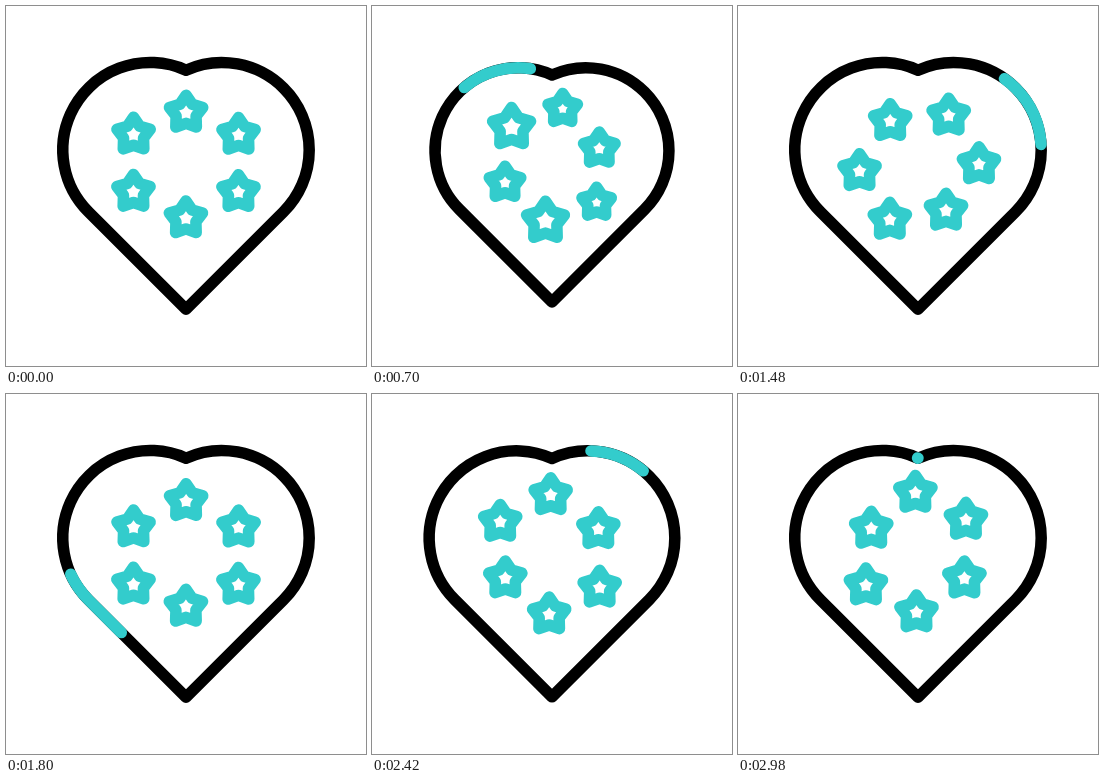
Animation, 360 px wide and 360 px high, one loop 3000 ms. Source, as an HTML page with a canvas:

```html
<!DOCTYPE html>
<html lang="en">
<head>
<meta charset="utf-8">
<title>Heart with circling stars</title>
<style>
  html, body { margin: 0; width: 100%; height: 100%; overflow: hidden; background: #fff; }
  canvas { display: block; }
</style>
</head>
<body>
<canvas id="stage" width="360" height="360"></canvas>
<script>
const ctx = document.getElementById('stage').getContext('2d');
const LOOP = 3000, BEAT = 1800, TURN = 3600;
const CX = 180, CY = 159.8, STROKE = 11.5, TEAL = '#33cccc';
const rad = deg => deg * Math.PI / 180;
const smooth = u => { u = Math.min(1, Math.max(0, u)); return u * u * (3 - 2 * u); };

// Eased values at evenly spaced times.
function keys(values, step, t) {
  const last = values.length - 1;
  if (t <= 0) return values[0];
  if (t >= last * step) return values[last];
  const i = Math.floor(t / step);
  return values[i] + (values[i + 1] - values[i]) * smooth(t / step - i);
}

// Heart: two arcs and a 45 degree point, starting at the notch, counter-clockwise.
const LOBE = 87.4, SIDE = 35.8, LOBE_Y = 143.9;
const notch = Math.asin(SIDE / LOBE);
const heart = new Path2D();
heart.arc(CX - SIDE, LOBE_Y, LOBE, rad(-90) + notch, rad(-225), true);
heart.lineTo(CX, LOBE_Y + LOBE * Math.SQRT2 + SIDE);
heart.arc(CX + SIDE, LOBE_Y, LOBE, rad(45), rad(-90) - notch, true);
heart.closePath();
const heartLength = 2 * (LOBE * (rad(135) + notch) + LOBE + SIDE * Math.SQRT2);

const star = new Path2D();
for (let i = 0; i < 10; i++) {
  const r = i % 2 ? 10.5 : 17.5, a = rad(i * 36 - 90);
  star.lineTo(r * Math.cos(a), r * Math.sin(a));
}
star.closePath();

// Offset from the centre and start of the single pulse.
const stars = [
  [0, -53, 700], [52.5, -31, 580], [52.5, 26.3, 460],
  [0, 52.6, 340], [-52.5, 26.3, 460], [-52.5, -31, 580]
];

// Two laps along an ease-in-out curve.
function laps(t) {
  let lo = 0, hi = 1;
  for (let i = 0; i < 24; i++) {
    const q = (lo + hi) / 2, p = 1 - q;
    const time = 470 + 3351 * p * p * q + 3342 * p * q * q + 2505 * q * q * q;
    if (time < t) lo = q; else hi = q;
  }
  return 2 * smooth(lo);
}

function draw(t) {
  const beat = keys([1, 1.05, 0.9, 1, 0.9, 1], 200, t % BEAT);
  ctx.fillStyle = '#fff';
  ctx.fillRect(0, 0, 360, 360);
  ctx.lineCap = ctx.lineJoin = 'round';

  ctx.save();
  ctx.translate(CX, CY);
  ctx.scale(beat, beat);
  ctx.translate(-CX, -CY);
  ctx.lineWidth = STROKE / beat;
  ctx.strokeStyle = '#000';
  ctx.stroke(heart);
  if (t >= 15) {
    const part = 0.102 * smooth(t / 800) * smooth((2950 - t) / 800);
    const dash = Math.max(0.5, part * heartLength);
    ctx.setLineDash([dash, heartLength - dash]);
    ctx.lineDashOffset = -(laps(t) % 1) * heartLength;
    ctx.strokeStyle = TEAL;
    ctx.stroke(heart);
  }
  ctx.restore();

  const turn = t / TURN * 2 * Math.PI, c = Math.cos(turn), s = Math.sin(turn);
  ctx.strokeStyle = TEAL;
  for (const [x, y, start] of stars) {
    const size = beat * keys([1, 0.93, 1.2, 1], 120, t - start);
    ctx.save();
    ctx.translate(CX + beat * (x * c - y * s), CY + beat * (x * s + y * c));
    ctx.scale(size, size);
    ctx.lineWidth = STROKE / size;
    ctx.stroke(star);
    ctx.restore();
  }
}

const began = performance.now();
function tick() {
  draw((performance.now() - began) % LOOP);
  requestAnimationFrame(tick);
}
tick();
</script>
</body>
</html>
```
